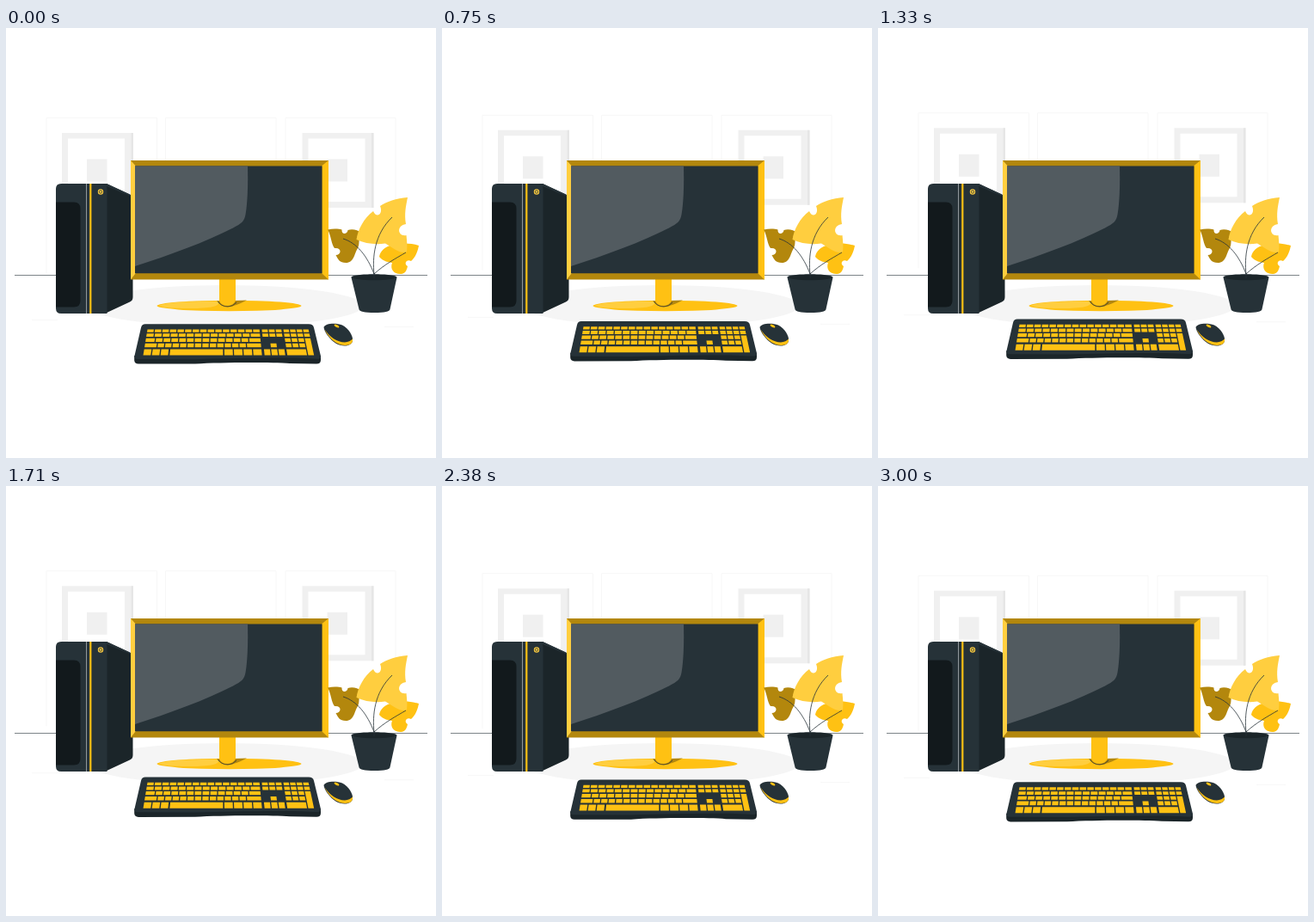
These frames come from a looping animation (500x500 px, 3040 ms). An HTML page:

```html
<!DOCTYPE html>
<html lang="en">
<head>
<meta charset="utf-8">
<title>Desktop computer</title>
<style>
  html, body { margin: 0; width: 100%; height: 100%; overflow: hidden; background: #fff; }
  svg { display: block; width: 100vw; height: 100vh; }
  .dark { fill: #263238; }
  .deep { fill: #1b2529; }
  .gold { fill: #ffc113; }
  .light { fill: #ffce3f; }
  .brown { fill: #b3870d; }
  .line { fill: none; stroke: #263238; stroke-width: .8; }
  .faint { fill: none; stroke: #f7f7f7; }
</style>
</head>
<body>
<svg viewBox="0 0 500 500">
  <defs>
    <g id="picture">
      <path fill="#f0f0f0" d="M65 122h83v87h-83z"/>
      <path fill="#e6e6e6" d="M145.5 122h2.5v87h-2.5z"/>
      <path fill="#fff" d="M72 128.5h66v73.500h-66z"/>
      <path fill="#f0f0f0" d="M94 152.500h23.500v26h-23.500z"/>
    </g>
  </defs>

  <g class="float">
    <path class="faint" d="M47 285V104.500H175.500V285M185.500 285V104.500H314V285M325 285V104.500H453V285M30 339.500H60M440 347.500H474"/>
    <use href="#picture"/>
    <use href="#picture" x="279.500"/>
  </g>

  <path d="M10 287.500H490" stroke="#7d8488"/>
  <ellipse cx="255" cy="323" rx="160" ry="24" fill="#f5f5f5"/>

  <!-- tower -->
  <path class="deep" d="M112 181H117L144 193.500Q147.500 195.500 147.500 199V313Q147.500 317 144 318.500L115 332H110z"/>
  <path class="dark" d="M64 181H112Q117.500 181 117.500 187V332H64Q58 332 58 326V187Q58 181 64 181z"/>
  <path class="dark" d="M113 181H117L144 193.500L146 196L117 184z"/>
  <path fill="#12191c" d="M58 202.500H79Q86.500 202.500 86.500 210V317Q86.500 324.500 79 324.500H58z"/>
  <path d="M93.500 181V332" stroke="#aeb3b6" stroke-width=".8"/>
  <path d="M98.300 181V332" stroke="#ffc113" stroke-width="2.200"/>
  <circle class="light" cx="110" cy="190.500" r="3.200"/>
  <circle cx="110" cy="190.500" r="1.700" fill="none" stroke="#263238" stroke-width=".8"/>

  <!-- monitor -->
  <ellipse class="gold" cx="259.500" cy="323" rx="84" ry="6.200"/>
  <path class="light" d="M178 322.500C188 318.500 220 317.500 247 318C250 324 235 326 215 326C196 326 180 325 178 322.500z"/>
  <path class="brown" d="M246 317.500Q250 324 258 324Q266 324 280 316.500L267 317z"/>
  <path class="gold" d="M248 290H267V317Q264 323 257.500 323Q250 323 248 317z"/>
  <path class="line" d="M246 317.500Q250 324 258 324Q264 324 268 319"/>
  <path class="brown" d="M145 154H375V292.500H145z"/>
  <path class="light" d="M145 154L150.500 160V285.500L145 292.500z"/>
  <path class="gold" d="M375 154L367.500 160V285.500L375 292.500z"/>
  <path class="dark" d="M150 160.500H367.500V285.300H150z"/>
  <path fill="#525b60" d="M150 160.500H281C281.500 182 281 202 278.500 217C277 225 274 227 264 232.500C232 249 190 264 150 277z"/>

  <!-- plant -->
  <path class="brown" d="M374 234.500C381 233 387 233.500 390.500 234.500C390 241 397 240 397.500 235C403 233 409 235 413 238C409 245 412 250 409 256C405 262 405 273 395 273C388 273 386 269 383.500 264C390 264 391 255 382 256C378 251 378 241 374 234.500z"/>
  <path class="gold" d="M480 253C470 250 460 250 450 252C440 254 435 260 434 266C439 272 445 272 449 273C446 281 452 287 460 286C465 285 466 281 467 277C462 274 466 268 471 271C476 267 479 259 480 253z"/>
  <path class="light" d="M467 197C454 198 442 202 435 207C439 216 431 222 427 213C416 221 409 235 407.500 246C418 251 430 252 441 250.500C449 255 460 264 466 260C467 253 466 247 465.500 241C456 243 453 230 465 228C463 216 465 207 467 197z"/>
  <path class="line" d="M428 286C426 267 428 240 449 220M428 286C420 265 408 250 392 245M428 286C440 275 453 268 465 261"/>
  <path class="dark" d="M401.500 290C401 285 455 285 454.500 290L446.500 327Q446 331 428.500 331Q411 331 410.500 327z"/>
  <ellipse class="deep" cx="428" cy="290" rx="25" ry="3.200"/>
  <path class="line" d="M428 291V285"/>

  <!-- mouse -->
  <path class="dark" d="M369.500 348C371 343 384 342.500 391 345.500C398 349 404 358 403 364C401 371 390 370.500 384 367C376 362 370 353 369.500 348z"/>
  <path class="gold" d="M370.500 350.500C376 359 385 365.500 394 365.500Q400 365 403 361.500C404 368 397 370 390 368.500C381 366 374 358 370.500 350.500z"/>
  <ellipse class="gold" cx="384.500" cy="346.500" rx="3.200" ry="1.500" transform="rotate(28 384.500 346.500)"/>

  <g class="float">
    <path class="deep" d="M149.200 381V386.500Q149.500 390.600 154 390.600L220 390.500C250 388.500 310 388.500 330 390L361 390.500Q366 390.500 366 386V381z"/>
    <path class="dark" d="M162 344.300H352Q357 344.300 358 348.500L366 381.500Q366.500 385 362 384.800C330 382.500 270 384 220 385.200L153 385Q149 385 149.500 381L157 348.500Q158 344.300 162 344.300z"/>
    <g id="keys" class="gold"></g>
  </g>
</svg>
<script>
const PERIOD = 3040, RISE = 6.5;
const rows = [[350.5, 353.7], [355.3, 359.1], [360.8, 365], [366.7, 371.3], [373.4, 380.4]];
let d = "";

// The keyboard widens towards the viewer.
function point(x, y) {
  const depth = (y - 350.5) / 30;
  return (x + depth * (-5 + 11.5 * (x - 164) / 188)).toFixed(2) + " " + y;
}

function key(left, right, row, last = row) {
  const top = rows[row][0], bottom = rows[last][1];
  d += `M${point(left, top)}L${point(right, top)}L${point(right, bottom)}L${point(left, bottom)}z`;
}

function run(from, to, count, row) {
  const step = (to - from) / count;
  for (let i = 0; i < count; i++) key(from + i * step, from + (i + 1) * step - 1.3, row);
}

run(164.5, 296, 15, 0);
for (const [row, first, last] of [[1, 174, 284], [2, 176, 282], [3, 179, 279]]) {
  key(164.5, first - 1.3, row);
  run(first, last, 12, row);
  key(last, 294.7, row);
}
run(164.5, 193, 3, 4);
key(193.5, 252, 4);
run(253.5, 296, 4, 4);

run(297.5, 321.5, 3, 0);
run(297.5, 321.5, 3, 1);
key(305.5, 312.2, 3);
run(297.5, 321.5, 3, 4);

run(322.5, 353, 4, 0);
run(322.5, 353, 4, 1);
run(322.5, 345.4, 3, 2);
run(322.5, 345.4, 3, 3);
key(322.5, 344.1, 4);
key(345.4, 351.7, 2, 4);

const path = document.createElementNS("http://www.w3.org/2000/svg", "path");
path.setAttribute("d", d);
document.getElementById("keys").append(path);

const floats = document.querySelectorAll(".float");
const start = performance.now();
function draw() {
  const phase = (performance.now() - start) % PERIOD / PERIOD;
  const y = -RISE * (1 - Math.abs(1 - 2 * phase));
  for (const g of floats) g.setAttribute("transform", `translate(0 ${y.toFixed(3)})`);
  requestAnimationFrame(draw);
}
draw();
</script>
</body>
</html>
```
